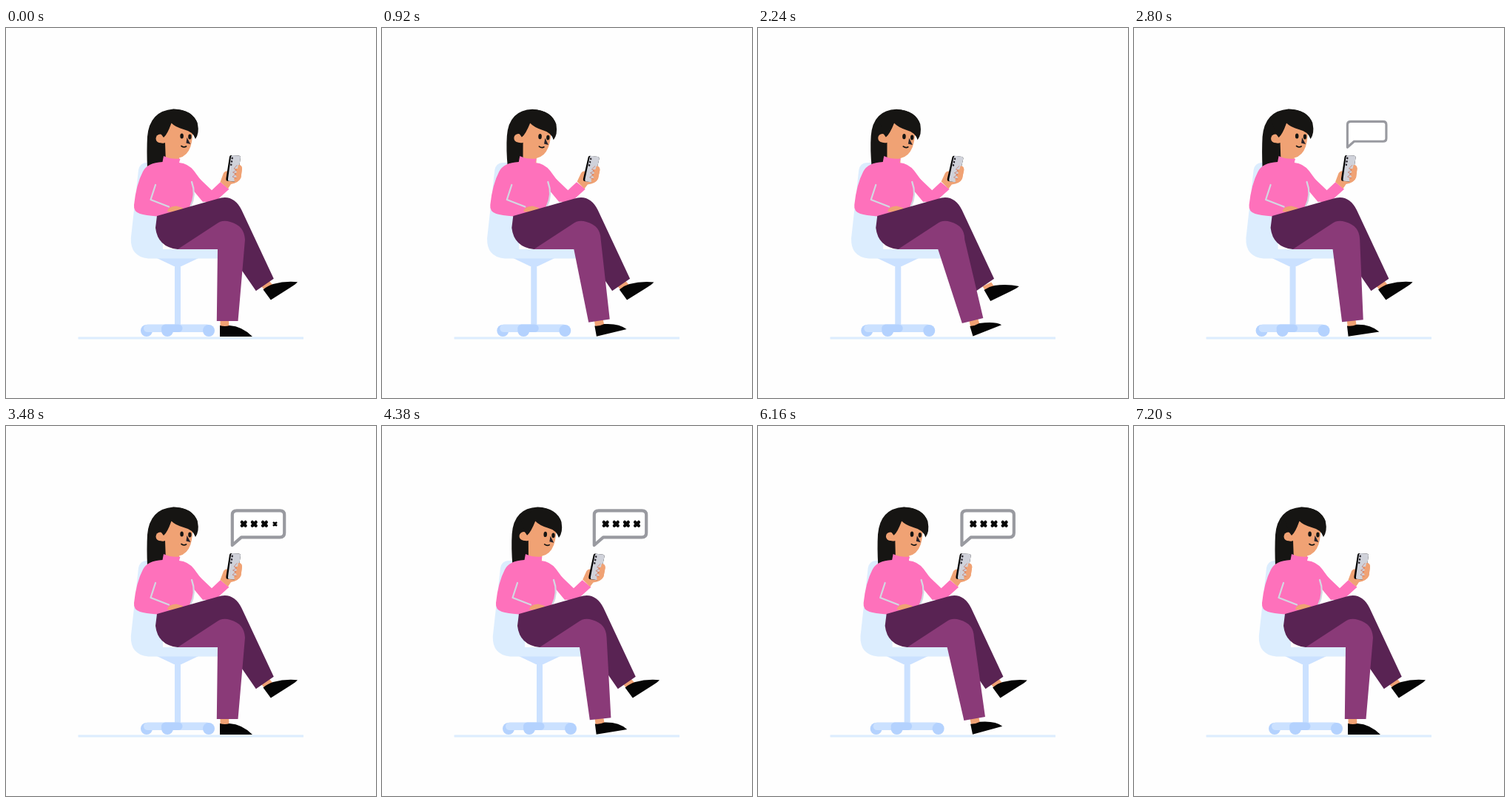
These frames come from a looping animation (500x500 px, 7.22 s). An HTML page with a canvas:

```html
<!DOCTYPE html>
<html lang="en">
<head>
<meta charset="utf-8">
<title>Woman with phone</title>
<style>
html, body { margin: 0; width: 100%; height: 100%; overflow: hidden; background: #fefefe; }
canvas { display: block; width: 500px; height: 500px; }
</style>
</head>
<body>
<canvas id="stage"></canvas>
<script>
const LOOP = 7220, CYCLE = 3600, SHIFT = -44.2;
const C = {
  bg: '#fefefe', pale: '#dcedfe', post: '#cbe1ff', wheel: '#b4d2fe',
  skin: '#f0a274', hair: '#161513', pink: '#fe71bb', line: '#d3d8e2',
  thigh: '#592353', shin: '#8a3a78', black: '#050505', phone: '#d0d2da', bubble: '#999aa0'
};
const canvas = document.getElementById('stage');
const ctx = canvas.getContext('2d');
const ratio = window.devicePixelRatio || 1;
canvas.width = canvas.height = 500 * ratio;

const clamp = v => Math.max(0, Math.min(1, v));
const ease = (t, from, to) => { const u = clamp((t - from) / (to - from)); return u * u * (3 - 2 * u); };
const pulse = (t, a, b, c, d) => ease(t, a, b) - ease(t, c, d);
const mix = (a, b, p) => a + (b - a) * p;

function fill(d, color) {
  ctx.fillStyle = color;
  ctx.fill(new Path2D(d));
}
function stroke(d, color, width) {
  ctx.strokeStyle = color;
  ctx.lineWidth = width;
  ctx.stroke(new Path2D(d));
}
function oval(x, y, rx, ry, color) {
  ctx.fillStyle = color;
  ctx.beginPath();
  ctx.ellipse(x, y, rx, ry, 0, 0, Math.PI * 2);
  ctx.fill();
}
function pill(x, y, w, h, color) {
  ctx.fillStyle = color;
  ctx.beginPath();
  ctx.roundRect(x, y, w, h, h / 2);
  ctx.fill();
}
// Rotates a part about x, y and slides it by dx, dy.
function moved(x, y, degrees, dx, dy, draw) {
  ctx.save();
  ctx.translate(x + dx, y + dy);
  ctx.rotate(degrees * Math.PI / 180);
  ctx.translate(-x, -y);
  draw();
  ctx.restore();
}

function chair() {
  fill('M228 318H236V403H228Z', C.post);
  oval(190, 409, 8, 8, C.wheel);
  pill(186, 400.5, 91, 10.5, C.post);
  pill(210, 400.5, 28.5, 10.5, C.wheel);
  oval(218, 409, 8, 8, C.wheel);
  oval(274, 409, 8, 8, C.wheel);
  fill('M204 311H260L237 322H227Z', C.post);
  fill('M179 192Q180.5 182.5 190 182H212V299H290V311.5H192Q168 309 168.8 284Z', C.pale);
}

function head(tilt) {
  fill('M' + (191 + 5 * tilt) + ' 190Q' + (190 + 2.5 * tilt) + ' 165 ' + (191 + 2 * tilt) +
    ' 147Q194 112 226 109.5Q252 110 259 129L232 150L216 184Z', C.hair);
  fill('M223 127Q218 143 213 147L208 154.8Q212 156.5 215 155L216 182H234V175.5Q245 173 249.5 160Q253 148 252 134Z', C.skin);
  oval(208.3, 149.4, 5.8, 5.8, C.skin);
  fill('M203 125L226 109.8Q252 110 259 130Q261.5 142 256 150Q253 140 240 137Q229 134 223.5 128.5Q218 144 213 148L210 144Z', C.hair);
  oval(237.6, 146, 2.3, 3.6, C.hair);
  oval(248.4, 147, 2.2, 3.4, C.hair);
  fill('M244.5 148L249.4 157L243.5 155.6Z', '#26222a');
  stroke('M237 159.5Q240.5 162 243.5 160', C.hair, 1.7);
}

function torso() {
  fill('M213 173Q224 178 235.5 176.5L234 182Q246 183 254 193L268 212Q274 221 283 233L266 235L253.5 220Q254 232 249 243L204 254.5Q188 253 181 251Q172 248 173 239Q176 211 185 194Q191 182 211.5 181Z', C.pink);
  fill('M261 203L278 219.3L289.7 208.2L301.5 217.8L279 238L268 234Z', C.pink);
  stroke('M202 212L195.5 232L220 241.5', C.line, 2.2);
  stroke('M251 208Q257.5 225 249 242', C.line, 2.2);
  fill('M218 248Q219 241 230 240.5L239 243L237 250Z', C.skin);
}

function handAndPhone() {
  fill('M289.5 208L294 196Q297 192 300 194L308 185Q318 183 319 190L317.5 202Q315 209 304 211L300 217Z', C.skin);
  fill('M304 172L315 172.5Q317.3 173 317 175L312.5 205Q312 207.5 309 207.4L299 206.7Q297 206 297.4 203.5L302 174Q302.5 172 304 172Z', C.black);
  fill('M306 172L315 172.5Q317.3 173 317 175L312.5 205Q312 207.5 309.5 207.4L301 206.8Q299.5 206 300 203.5L304 174Q304.5 172 306 172Z', C.phone);
  for (let i = 0; i < 3; i++) oval(305.7 - i * 0.7, 176 + i * 4.4, 1.2, 1.4, '#28252c');
  fill('M314 185Q319 185 319 190L317.5 202Q315 208 309 208L308 203L312 201L308 197L312 195L309 190L313 190Z', C.skin);
  stroke('M312 185.5L308 190L311.5 192L306.5 195L311 197L306 201L311 203', '#c5705d', 0.7);
}

function crossedLeg(dip) {
  moved(353, 350, 7 * dip, 1.2 * dip, 1.3 * dip, () => {
    fill('M345 349L356 342L362 349L351 356Z', C.skin);
    fill('M347.5 353.5Q354 348 361 346Q377 341.7 394 343.3Q392 346 383 351.5L357.8 367.5Z', C.black);
  });
  fill('M204 254L286 230.8Q307 223.6 318.4 246L361.8 338.8L337.8 355.3L299 299H232Q205 296 202 270Z', C.thigh);
}

// The planted leg follows the chair with its knee while its foot stays on the floor.
function plantedLeg(p, dx) {
  const at = (x1, y1, x2, y2) => mix(x1, x2, p) + ' ' + mix(y1, y2, p) + ' ';
  fill('M' + at(289.5, 394, 285, 395) + 'L' + at(301, 394, 296.5, 391) +
    'L' + at(301.5, 404, 300, 402) + 'L' + at(289.5, 404, 287.5, 405) + 'Z', C.skin);
  fill('M' + at(289, 402, 286.3, 403) + 'L' + at(289, 417, 290.5, 416.5) +
    'L' + at(333, 417, 329, 400.6) + 'Q' + at(319, 403, 321, 396) +
    at(302, 402, 299, 398.8) + 'Q' + at(296, 404, 293, 402.5) + at(289, 402, 286.3, 403) + 'Z', C.black);
  const body = (x, y) => (x + dx) + ' ' + y + ' ';
  fill('M' + body(232, 299) + 'L' + body(284, 265) + 'Q' + body(292, 258.5) + body(303, 262) +
    'Q' + body(322, 267) + body(mix(323, 322, p), 286) +
    'L' + at(313.5, 396, 304, 391.8) + 'L' + at(284.8, 396, 275.5, 399) +
    'L' + body(286, 299) + 'Z', C.shin);
}

function bubble(t) {
  const size = pulse(t, 2640, 2880, 6560, 6800);
  if (size <= 0) return;
  ctx.save();
  ctx.translate(305.8, 162);
  ctx.scale(size, size);
  ctx.translate(-305.8, -162);
  const d = 'M305.8 161V120Q305.8 114.3 312 114.3H370.2Q376.2 114.3 376.2 120V144.5Q376.2 150.3 370.2 150.3H318Z';
  fill(d, '#fff');
  stroke(d, C.bubble, 4.2);
  for (let i = 0; i < 4; i++) {
    const start = 2950 + i * 140, s = ease(t, start, start + 180);
    if (!s) continue;
    ctx.save();
    ctx.translate(321.2 + i * 14.1, 132.3);
    ctx.scale(s, s);
    stroke('M-2.4 -2.4L2.4 2.4M2.4 -2.4L-2.4 2.4', C.black, 4.3);
    ctx.restore();
  }
  ctx.restore();
}

function draw(now) {
  const t = now % LOOP, c = t % CYCLE;
  const roll = pulse(c, 237, 1437, 2110, 3320);
  const tilt = pulse(c, 240, 1040, 2120, 2800);
  const dip = pulse(c, 840, 1440, 2160, 2600);
  const dx = SHIFT * roll;

  ctx.setTransform(ratio, 0, 0, ratio, 0, 0);
  ctx.lineJoin = ctx.lineCap = 'round';
  ctx.fillStyle = C.bg;
  ctx.fillRect(0, 0, 500, 500);
  fill('M97.5 417.5H402V420.5H97.5Z', C.pale);

  ctx.save();
  ctx.translate(dx, 0);
  chair();
  moved(224, 177, 2.5 * tilt, 1.5 * tilt, 0, () => head(tilt));
  torso();
  moved(296, 212, 4.5 * tilt, 0.6 * tilt, 0, handAndPhone);
  crossedLeg(dip);
  ctx.restore();

  plantedLeg(roll, dx);

  ctx.save();
  ctx.translate(dx, 0);
  bubble(t);
  ctx.restore();
}

const begin = performance.now();
function tick() {
  draw(performance.now() - begin);
  requestAnimationFrame(tick);
}
tick();
</script>
</body>
</html>
```
